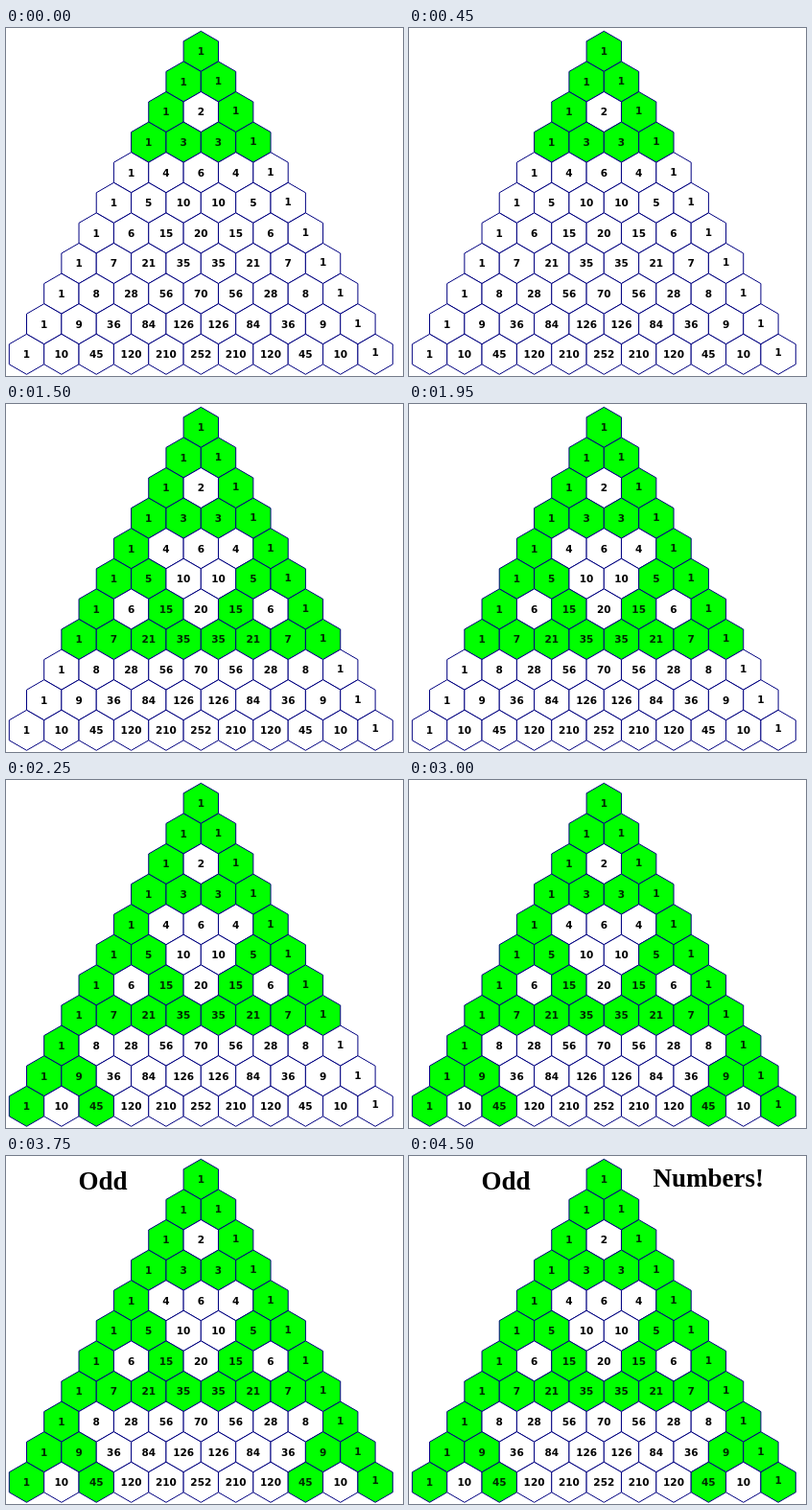
An HTML page for the animation above (5250 ms loop, 414 px wide and 363 px high).

```html
<!DOCTYPE html>
<html lang="en">
<head>
<meta charset="utf-8">
<title>Odd numbers in a number triangle</title>
<style>
  html, body { margin: 0; width: 100%; height: 100%; overflow: hidden; background: #fff; }
  svg { display: block; width: 100%; height: 100%; }
  polygon { fill: #fff; stroke: #000080; stroke-width: 1; }
  .num { font: bold 10.5px "DejaVu Sans", Verdana, sans-serif; text-anchor: middle; }
  .title { font: bold 27px "Liberation Serif", "Times New Roman", serif; }
</style>
</head>
<body>
<svg id="stage" viewBox="0 0 414 363">
  <text class="title" id="odd" x="75.5" y="35">Odd</text>
  <text class="title" id="numbers" x="254.5" y="32">Numbers!</text>
</svg>
<script>
const NS = "http://www.w3.org/2000/svg";
const stage = document.getElementById("stage");
const odd = document.getElementById("odd");
const numbers = document.getElementById("numbers");

const ROWS = 11, STEP = 750, STEPS = 7;
const TOP_X = 203.3, TOP_Y = 24.3, DX = 36.36, DY = 31.6, R = 21;
const GREEN = "#00ff00";

function add(tag, attrs) {
  const el = document.createElementNS(NS, tag);
  for (const key in attrs) el.setAttribute(key, attrs[key]);
  stage.appendChild(el);
  return el;
}

function hexagon(x, y) {
  const w = DX / 2, h = R / 2;
  return [[0, -R], [w, -h], [w, h], [0, R], [-w, h], [-w, -h]]
    .map(([a, b]) => (x + a).toFixed(2) + "," + (y + b).toFixed(2)).join(" ");
}

// Step at which an odd cell lights up: top block, then left and right halves
function litStep(row, col) {
  if (row < 4) return 0;
  return (row < 8 ? 1 : 3) + (col < 4 ? 0 : 1);
}

const cells = [];
for (let row = 0; row < ROWS; row++) {
  let value = 1;
  for (let col = 0; col <= row; col++) {
    const x = TOP_X + (col - row / 2) * DX;
    const y = TOP_Y + row * DY;
    const lift = row > 0 && col === row ? (row === ROWS - 1 ? 2 : 1) : 0;
    const hex = add("polygon", { points: hexagon(x, y) });
    const label = add("text", { class: "num", x, y: y + 3.8 - lift });
    label.textContent = value;
    cells.push({ hex, label, lit: value % 2 ? litStep(row, col) : Infinity });
    value = value * (row - col) / (col + 1);
  }
}

function show(el, on) {
  el.style.visibility = on ? "visible" : "hidden";
}

function draw(time) {
  const step = Math.floor(time / STEP) % STEPS;
  for (const { hex, label, lit } of cells) {
    const on = step >= lit;
    hex.style.fill = on ? GREEN : "#fff";
    label.style.fill = on ? "#002800" : "#000";
  }
  show(odd, step >= 5);
  show(numbers, step >= 6);
}

const start = performance.now();
function tick() {
  draw(performance.now() - start);
  requestAnimationFrame(tick);
}
tick();
</script>
</body>
</html>
```
